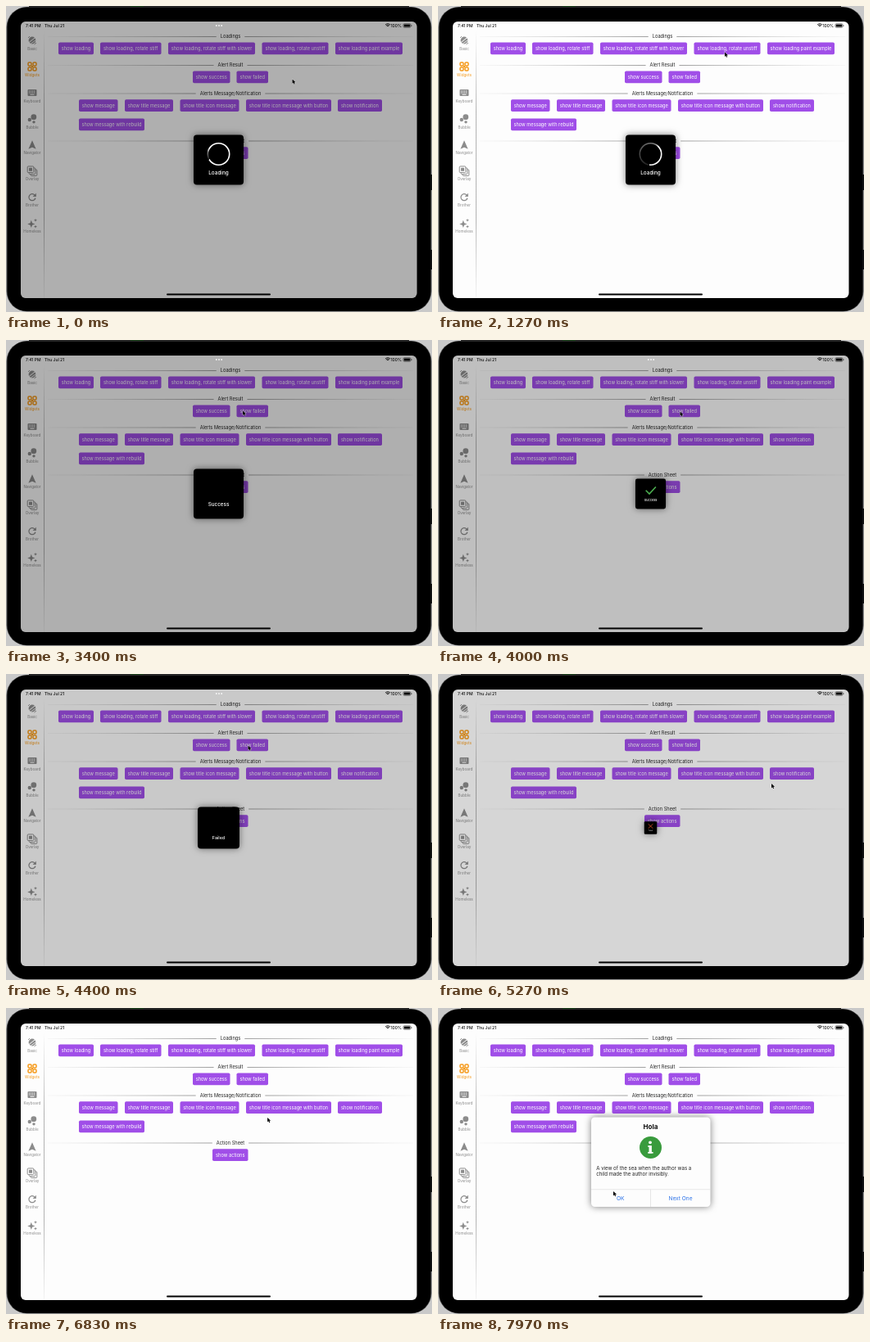
An HTML page with a canvas that plays this animation: 520 px wide and 374 px high, repeating every 8 s.

```html
<!DOCTYPE html>
<html lang="en">
<head>
<meta charset="utf-8">
<title>Dialog demo</title>
<style>
html, body { margin: 0; width: 100%; height: 100%; overflow: hidden; background: #000; }
canvas { display: block; width: 520px; height: 374px; }
</style>
</head>
<body>
<canvas id="stage"></canvas>
<script>
const W = 520, H = 374, LOOP = 8000, CX = 259.5, CY = 188;
const FONT = 'Inter, Roboto, sans-serif';
const PURPLE = '#a04ee8', GREY = '#8c8c8c', ORANGE = '#f59a1b';
const canvas = document.getElementById('stage');
const dpr = window.devicePixelRatio || 1;
canvas.width = W * dpr;
canvas.height = H * dpr;
const c = canvas.getContext('2d');

const clamp = v => Math.max(0, Math.min(1, v));
const span = (t, a, b) => clamp((t - a) / (b - a));
const smooth = u => u * u * (3 - 2 * u);
const rad = d => d * Math.PI / 180;

// Value list at time t from rows of [time, ...values]
function track(rows, t, ease = smooth) {
  if (t <= rows[0][0]) return rows[0].slice(1);
  for (let i = 1; i < rows.length; i++) {
    if (t > rows[i][0]) continue;
    const a = rows[i - 1], b = rows[i], u = ease(span(t, a[0], b[0]));
    return a.slice(1).map((v, k) => v + (b[k + 1] - v) * u);
  }
  return rows[rows.length - 1].slice(1);
}

const POINTER = [
  [0, 349.5, 89.5], [650, 349.5, 89.5], [1270, 350, 56.5], [1620, 448, 46],
  [1700, 418, 51.5], [2480, 300, 78], [2800, 250, 86], [3170, 250, 86],
  [3400, 289, 86.5], [3700, 295.5, 87.5], [4600, 295.5, 87.5], [5270, 407, 134],
  [5500, 431, 121], [5780, 431, 121], [6230, 292.5, 204], [6380, 295, 225],
  [6560, 295, 225], [6900, 322, 123], [7530, 322, 123], [7720, 148, 160], [7970, 214, 224]
];
const DIM = [
  [300, .31], [600, 0], [3160, 0], [3390, .31], [3950, .31], [4200, 0], [4260, 0],
  [4470, .31], [5130, .31], [5410, 0], [5640, 0], [5890, .32], [6480, .32], [6730, 0]
];

function box(x, y, w, h, r, fill) {
  c.beginPath();
  c.roundRect(x, y, w, h, r);
  c.fillStyle = fill;
  c.fill();
}
function disc(x, y, r, fill) {
  c.beginPath();
  c.arc(x, y, r, 0, 7);
  c.fillStyle = fill;
  c.fill();
}
function text(s, x, y, size, color, align = 'center', weight = 400) {
  c.font = `${weight} ${size}px ${FONT}`;
  c.textAlign = align;
  c.textBaseline = 'alphabetic';
  c.fillStyle = color;
  c.fillText(s, x, y + size * .36);
}
function poly(points, color, width) {
  c.beginPath();
  points.forEach(([x, y]) => c.lineTo(x, y));
  c.strokeStyle = color;
  c.lineWidth = width;
  c.stroke();
}

function device() {
  c.fillStyle = '#c9c9c9';
  c.fillRect(0, 0, W, H);
  c.fillStyle = '#222';
  c.fillRect(28, 0, 464, 2);
  c.fillStyle = '#143c14';
  c.fillRect(152, 0, 16, 1.5);
  box(.5, 1, 519, 372.5, 25, '#555');
  box(1.5, 1.5, 517, 371.5, 24, '#000');
  c.fillStyle = '#111';
  c.fillRect(518, 206, 2, 19);
  c.fillRect(518, 298, 2, 24);
}

function statusBar() {
  text('7:41 PM', 24, 24, 5, '#111', 'left', 500);
  text('Thu Jul 21', 47, 24, 5, '#111', 'left', 500);
  text('100%', 483, 24, 5, '#111', 'right', 500);
  c.strokeStyle = '#111';
  c.lineWidth = .8;
  for (const r of [1.6, 3, 4.3]) {
    c.beginPath();
    c.arc(466, 26, r, rad(-135), rad(-45));
    c.stroke();
  }
  c.beginPath();
  c.roundRect(485, 21.8, 9, 4.4, 1.2);
  c.lineWidth = .5;
  c.stroke();
  box(485.8, 22.6, 7.4, 2.8, .6, '#111');
  box(494.6, 23.2, .7, 1.6, .3, '#111');
}

// Each icon is drawn around its own centre
const ICONS = {
  Basic() {
    disc(0, 0, 4.4, GREY);
    poly([[-5.2, 3.5], [5, -4.5]], '#fdfdfd', 1);
    poly([[-3, 5], [5.5, -1]], '#fdfdfd', .8);
    poly([[-5, -3], [-3, -5]], GREY, .9);
    poly([[2.5, 5], [5, 3]], GREY, .9);
  },
  Widgets() {
    for (const x of [-3, 3]) for (const y of [-3, 3]) {
      c.beginPath();
      c.roundRect(x - 2, y - 2, 4, 4, 1.2);
      c.strokeStyle = ORANGE;
      c.lineWidth = 1.5;
      c.stroke();
    }
    disc(0, 0, 1.2, ORANGE);
  },
  Keyboard() {
    box(-5.5, -4, 11, 8, 1, GREY);
    for (let x = -4; x < 4; x += 2) for (const y of [-2.4, -.4]) box(x, y, 1.1, 1.1, 0, '#fdfdfd');
    box(-2.5, 1.8, 5, 1, 0, '#fdfdfd');
  },
  Bubble() {
    disc(1.8, -2.2, 3.4, GREY);
    disc(-3.2, 1.2, 2.2, GREY);
    disc(2, 4, 1.7, GREY);
  },
  Navigator() {
    c.beginPath();
    [[0, -5.5], [4.6, 5], [0, 3], [-4.6, 5]].forEach(p => c.lineTo(...p));
    c.fillStyle = GREY;
    c.fill();
  },
  Overlay() {
    for (const d of [2, 0, -2]) {
      box(d - 3.8, d - 3.8, 7.6, 7.6, 1, '#fdfdfd');
      c.strokeStyle = GREY;
      c.lineWidth = 1;
      c.stroke();
    }
    box(-4, -4, 4, 4, .5, GREY);
  },
  Brother() {
    c.beginPath();
    c.arc(0, 0, 4, rad(15), rad(315));
    c.strokeStyle = GREY;
    c.lineWidth = 1.3;
    c.stroke();
    c.beginPath();
    [[4.8, -5], [4.8, -.6], [.6, -.6]].forEach(p => c.lineTo(...p));
    c.fillStyle = GREY;
    c.fill();
  },
  Homeless() {
    for (const [x, y, r] of [[-1.2, .8, 4.6], [4, -3.8, 2], [4, 4, 2]]) {
      c.beginPath();
      for (let i = 0; i < 8; i++) {
        const q = i % 2 ? r * .38 : r, a = i * Math.PI / 4;
        c.lineTo(x + q * Math.cos(a), y + q * Math.sin(a));
      }
      c.fillStyle = GREY;
      c.fill();
    }
  }
};

function sidebar() {
  Object.keys(ICONS).forEach((name, i) => {
    const y = 42 + i * 31.95;
    c.save();
    c.translate(32, y);
    ICONS[name]();
    c.restore();
    text(name, 32, y + 10, 4.6, name === 'Widgets' ? ORANGE : GREY);
  });
  const g = c.createLinearGradient(0, 30, 0, 357);
  g.addColorStop(0, 'rgba(150,150,150,0)');
  g.addColorStop(.3, 'rgba(150,150,150,.9)');
  g.addColorStop(.7, 'rgba(150,150,150,.9)');
  g.addColorStop(1, 'rgba(150,150,150,.1)');
  c.fillStyle = g;
  c.fillRect(46, 30, .8, 327);
}

function heading(s, y) {
  text(s, 274, y, 5.7, '#222');
  const half = c.measureText(s).width / 2 + 5;
  for (const dir of [-1, 1]) {
    const near = 274 + dir * half, far = 274 + dir * 223;
    const g = c.createLinearGradient(near, 0, far, 0);
    g.addColorStop(0, '#777');
    g.addColorStop(1, 'rgba(170,170,170,.1)');
    poly([[near, y + .5], [far, y + .5]], g, .7);
  }
}

const BUTTONS = [
  ['show loading', 64, 44.5, 43], ['show loading, rotate stiff', 115, 44.5, 74.5],
  ['show loading, rotate stiff with slower', 198, 44.5, 106],
  ['show loading, rotate unstiff', 312.5, 44.5, 81],
  ['show loading paint example', 402, 44.5, 82],
  ['show success', 228, 79.5, 45.5], ['show failed', 281.5, 79.5, 38.5],
  ['show message', 89, 114.3, 47.5], ['show title message', 145, 114.3, 59],
  ['show title icon message', 212.5, 114.3, 72],
  ['show title icon message with button', 293, 114.3, 104],
  ['show notification', 405, 114.3, 54],
  ['show message with rebuild', 89, 137.5, 80], ['show actions', 252, 172.3, 43.5]
];

function page() {
  box(18, 19, 483.5, 338, 6, '#fdfdfd');
  statusBar();
  sidebar();
  heading('Loadings', 37);
  heading('Alert Result', 72);
  heading('Alerts Message/Notification', 106.5);
  heading('Action Sheet', 164.5);
  for (const [s, x, y, w] of BUTTONS) {
    box(x, y, w, 14.8, 1.8, PURPLE);
    text(s, x + w / 2, y + 7.4, 5.7, '#fff');
  }
}

// Draws a panel that grows in from `start` and shrinks away from `end`
function popup(t, start, end, draw) {
  if (t < start || t > end + 280) return;
  const grow = 1 - (1 - span(t, start, start + 130)) ** 2;
  const k = grow * (1 - span(t, end, end + 280)) ** 1.7;
  if (k < .01) return;
  c.save();
  c.translate(CX, CY);
  c.scale(k, k);
  c.translate(-CX, -CY);
  draw();
  c.restore();
}
function panel(x, y, w, h, r, fill) {
  c.save();
  c.shadowColor = 'rgba(0,0,0,.5)';
  c.shadowBlur = 9 * dpr;
  box(x, y, w, h, r, fill);
  c.restore();
}
function toast(size, label, fontSize) {
  panel(CX - size / 2, CY - size / 2, size, size, 4, '#000');
  text(label, CX, label === 'Loading' ? 204 : 200.5, fontSize, '#fff', 'center', 500);
}

function spinner(t) {
  const head = 150 + t * 305 / 1270;
  const bright = 240 + 80 * Math.cos(t * Math.PI / 1270);
  const g = c.createConicGradient(rad(head), CX, 181);
  const tail = 1 - bright / 360;
  g.addColorStop(0, 'rgba(255,255,255,.1)');
  g.addColorStop(tail, 'rgba(255,255,255,.5)');
  g.addColorStop(Math.min(1, tail + .06), '#fff');
  g.addColorStop(1, '#fff');
  c.beginPath();
  c.arc(CX, 181, 13.2, 0, 7);
  c.strokeStyle = g;
  c.lineWidth = 1.6;
  c.stroke();
}

function drawOn(points, u, color) {
  if (u <= 0) return;
  const parts = points.length - 1, n = Math.min(parts - 1, Math.floor(u * parts));
  const f = u * parts - n, a = points[n], b = points[n + 1];
  const tip = [a[0] + (b[0] - a[0]) * f, a[1] + (b[1] - a[1]) * f];
  poly([...points.slice(0, n + 1), tip], color, 2.6);
}

function success(t) {
  toast(61, 'Success', 6.3);
  drawOn([[250, 181], [257, 188], [270, 174]], span(t, 3470, 3800), '#4caf50');
}
function failed(t) {
  toast(51, 'Failed', 5.4);
  drawOn([[250, 172.5], [269, 190.5]], span(t, 4480, 4650), '#e2552b');
  drawOn([[269, 172.5], [250, 190.5]], span(t, 4650, 4820), '#e2552b');
}

function alertBox(y, h, title, titleY, weight, lines, left, right, strong) {
  panel(187, y, 145.5, h, 4.5, '#fdfdfd');
  text(title, CX, titleY, 8.1, '#111', 'center', weight);
  for (const [s, x, ly, size] of lines) text(s, x, ly, size, '#222', 'left');
  const rule = y + h - 21.2;
  poly([[187, rule], [332.5, rule]], '#d5d5d5', .6);
  poly([[CX, rule], [CX, y + h]], '#d5d5d5', .6);
  const blue = strong ? '#4468dc' : '#2f74e8';
  text(left, 222.7, y + h - 10.5, 6.6, blue);
  text(right, 296, y + h - 10.5, 6.6, blue, 'center', strong ? 700 : 400);
}
function notification() {
  const lines = [
    'The man of this car does not belong to you.',
    'For further understanding, please go to the',
    'QV7 store and view the specific tyre and car',
    'information.'
  ].map((s, i) => [s, 199.8, 170 + i * 6.9, 5.6]);
  alertBox(139.5, 97, 'Notification', 157, 500, lines, 'Cancel', 'Go to view', true);
}
function greeting() {
  const lines = ['A view of the sea when the author was a', 'child made the author invisibly.']
    .map((s, i) => [s, 193.3, 195.5 + i * 7.5, 6.05]);
  alertBox(133.5, 109.5, 'Hola', 145, 700, lines, 'OK', 'Next One', false);
  disc(CX, 170.5, 13.5, '#399b3d');
  disc(259, 164.3, 1.9, '#fff');
  c.fillStyle = '#fff';
  c.fillRect(257.5, 168.2, 3.4, 9.3);
  c.fillRect(256.2, 168.2, 3, 1.6);
  c.fillRect(256.2, 176, 6.4, 1.7);
}

function pointer(x, y) {
  c.beginPath();
  [[0, 0], [0, 5.4], [1.3, 4.3], [2.2, 6.3], [3.2, 5.8], [2.3, 3.9], [4, 3.8]]
    .forEach(([dx, dy]) => c.lineTo(x + dx, y + dy));
  c.closePath();
  c.strokeStyle = 'rgba(255,255,255,.8)';
  c.lineWidth = .8;
  c.stroke();
  c.fillStyle = '#000';
  c.fill();
}

function render(t) {
  c.setTransform(dpr, 0, 0, dpr, 0, 0);
  device();
  page();
  const [dim] = track(DIM, t, u => u);
  if (dim > 0) {
    box(18, 19, 483.5, 338, 6, `rgba(0,0,0,${dim})`);
    const a = span(dim, .15, .21);
    for (const x of [256.8, 260, 263.2]) disc(x, 24, .9, `rgba(255,255,255,${a * .9})`);
  }
  box(196, 351.4, 127, 2, 1, '#000');
  popup(t, -500, 2600, () => { toast(61, 'Loading', 6.4); spinner(t); });
  popup(t, 3180, 3930, () => success(t));
  popup(t, 4265, 5130, () => failed(t));
  popup(t, 5650, 6480, notification);
  popup(t, 7000, 9000, greeting);
  pointer(...track(POINTER, t));
}

const begin = performance.now();
function tick() {
  render((performance.now() - begin) % LOOP);
  requestAnimationFrame(tick);
}
tick();
</script>
</body>
</html>
```
